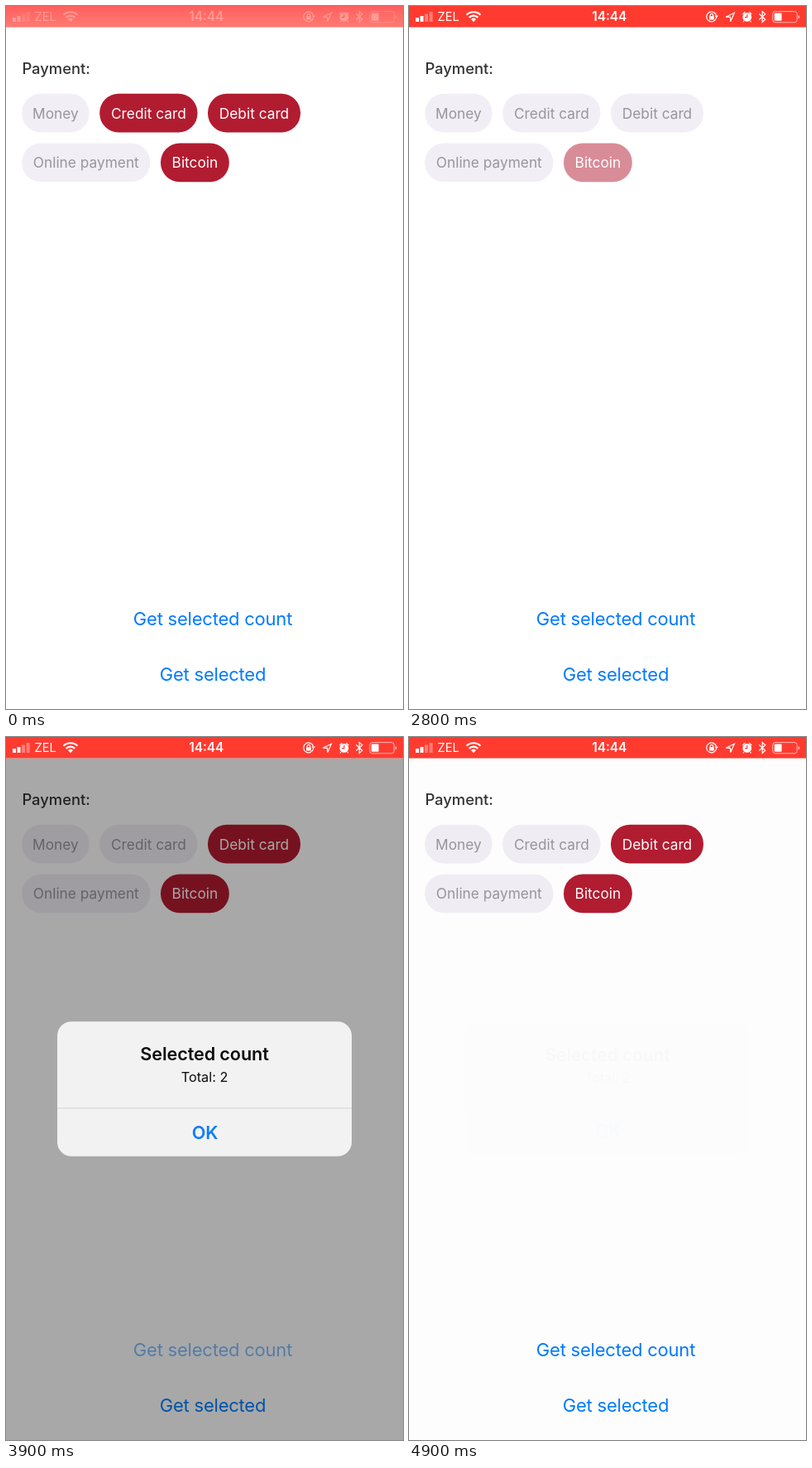
Animation, 480 px wide and 848 px high, one loop 5000 ms. Source, as an HTML page:

```html
<!DOCTYPE html>
<html lang="en">
<head>
<meta charset="utf-8">
<title>Payment chips</title>
<style>
  html, body { margin: 0; width: 100%; height: 100%; overflow: hidden; background: #fff; }
  svg { display: block; width: 100vw; height: 100vh; }
  text { font-family: Inter, Roboto, sans-serif; font-size: 17.3px; }
  .mid { text-anchor: middle; }
  .link { font-size: 22px; letter-spacing: -.01em; fill: #007aff; }
  .bold { font-size: 21px; font-weight: 600; letter-spacing: -.005em; }
  .line { fill: none; stroke: #fff; stroke-width: 1.2; }
</style>
</head>
<body>
<svg viewBox="0 0 480 848">
  <defs>
    <linearGradient id="wash" x2="0" y2="1">
      <stop offset="0" stop-color="#ff605e"/>
      <stop offset="1" stop-color="#ff7a72"/>
    </linearGradient>
    <clipPath id="card"><rect x="67.2" y="345.6" width="345.6" height="157.8" rx="16.6"/></clipPath>
  </defs>
  <rect width="480" height="848" fill="#fff"/>

  <text x="19.4" y="82" fill="#333" style="font-size:18.4px;font-weight:500">Payment:</text>
  <g id="chips"></g>
  <text id="count" class="mid link" x="250" y="747.3">Get selected count</text>
  <text class="mid link" x="250" y="814">Get selected</text>

  <rect id="dim" y="25.6" width="480" height="823"/>
  <g id="alert">
    <g clip-path="url(#card)">
      <rect x="67" y="345" width="346" height="159" fill="#f9f9f9"/>
      <rect id="row" x="67" y="447" width="346" height="57" fill="#ebebeb"/>
      <rect x="67" y="446.6" width="346" height="1" fill="#d9d9db"/>
    </g>
    <text class="mid bold" x="240" y="391.3">Selected count</text>
    <text class="mid" x="240" y="416.6" style="font-size:15.8px">Total: 2</text>
    <text class="mid bold" x="240.6" y="483.4" fill="#007aff">OK</text>
  </g>

  <rect id="bar" width="480" height="25.6"/>
  <g id="status" fill="#fff">
    <path d="M8 14h4v5h-4zM13.5 12h4v7h-4z"/>
    <path d="M19 9.5h4v9.5h-4zM24.6 7h4v12h-4z" opacity=".35"/>
    <text x="34.5" y="18.3" style="font-size:14.6px">ZEL</text>
    <path d="M78 19.2l-3-3.2a4.3 4.3 0 0 1 6 0z"/>
    <path class="line" style="stroke-width:2.2" d="M72.7 13.9a7.5 7.5 0 0 1 10.6 0M69.6 10.7a12 12 0 0 1 16.8 0"/>
    <text class="mid" x="242.3" y="18.4" style="font-size:15.4px;font-weight:600">14:44</text>
    <path class="line" d="M371.6 14.2a6 6 0 1 1 0-2.6M364.2 12.5v-1.4a1.7 1.7 0 0 1 3.4 0v1.4"/>
    <path d="M363 12.2h5.8v4.2h-5.8zM369.4 11.6h4.6l-2.3 3z"/>
    <path class="line" d="M383.2 13.2l10.2-5-4.6 10.4-.4-5.2z"/>
    <circle cx="408.8" cy="13.4" r="5.4"/>
    <path class="line" d="M403.3 10l3-2.8M414.3 10l-3-2.8M405 18l-1 1.4M412.6 18l1 1.4"/>
    <path class="line" style="stroke:#ff3b30" d="M408.8 10v3.6h-2.8"/>
    <path class="line" d="M423.4 9.5l7.4 6.8-3.6 3.2v-13l3.6 3.2-7.4 6.8"/>
    <rect class="line" style="stroke-width:1;opacity:.65" x="439.8" y="6.6" width="29.4" height="13.2" rx="3"/>
    <rect x="441.8" y="8.6" width="8.8" height="9.2" rx="1"/>
    <path d="M470.6 11a2.4 2.4 0 0 1 0 4.6z" opacity=".65"/>
  </g>
</svg>
<script>
const $ = id => document.getElementById(id);
const set = (el, attrs) => { for (const k in attrs) el.setAttribute(k, attrs[k]); };
const add = (parent, tag, attrs) => {
  const el = document.createElementNS("http://www.w3.org/2000/svg", tag);
  set(el, attrs);
  return parent.appendChild(el);
};

// Linear interpolation through [time, value] points
function track(t, points) {
  if (t <= points[0][0]) return points[0][1];
  for (let i = 1; i < points.length; i++) {
    const [a, u] = points[i - 1], [b, v] = points[i];
    if (t <= b) return u + (v - u) * (t - a) / (b - a);
  }
  return points[points.length - 1][1];
}

// taps: [time, selected afterwards]
const chips = [
  { label: "Money", x: 19.2, y: 105.8, w: 81.4 },
  { label: "Credit card", x: 113.2, y: 105.8, w: 118.3, on: true, taps: [[1800, false]] },
  { label: "Debit card", x: 244, y: 105.8, w: 112, on: true, taps: [[1300, false], [3100, true]] },
  { label: "Online payment", x: 19.2, y: 165.5, w: 155.2 },
  { label: "Bitcoin", x: 187, y: 165.5, w: 82.8, on: true, taps: [[2300, false], [2800, true]] },
];
for (const c of chips) {
  c.group = add($("chips"), "g", {});
  c.box = add(c.group, "rect", { x: c.x, y: c.y, width: c.w, height: 46.8, rx: 23 });
  c.text = add(c.group, "text", { class: "mid", x: c.x + c.w / 2, y: c.y + 29.9 });
  c.text.textContent = c.label;
}

const fadeOff = [[0, .5], [100, .35], [200, .78], [300, 1]];
const fadeOn = [[0, .5], [100, .82], [200, 1]];
const shown = [[3700, 0], [3800, .5], [3900, .85], [4000, .96], [4100, .99], [4200, 1],
               [4600, 1], [4700, .55], [4800, .15], [4900, .015]];
const countFade = [[3600, 1], [3700, .2], [3800, .22], [3900, .5], [4000, .85], [4100, 1]];

function drawChip(c, t) {
  let on = !!c.on, opacity = 1;
  for (const [start, next] of c.taps || []) {
    const dt = t - start;
    if (dt < 0) continue;
    opacity = track(dt, next ? fadeOn : fadeOff);
    if (next || dt >= 100) on = next;
  }
  set(c.group, { opacity });
  set(c.box, { fill: on ? "#b21c31" : "#f2eef6" });
  set(c.text, { fill: on ? "#fff" : "#98959c" });
}

function draw(t) {
  chips.forEach(c => drawChip(c, t));
  set($("count"), { opacity: track(t, countFade) });

  const a = track(t, shown), closing = t >= 4600;
  const scale = closing ? 1 : 1 + .2 * (1 - a);
  set($("dim"), { opacity: .4 * a });
  set($("alert"), {
    opacity: closing ? a : Math.sqrt(a),
    transform: `translate(240 424.5) scale(${scale}) translate(-240 -424.5)`,
  });
  set($("row"), { opacity: closing ? 1 : 0 });

  const washed = t < 100;
  set($("bar"), { fill: washed ? "url(#wash)" : "#ff3b30" });
  set($("status"), { opacity: washed ? .3 : 1 });
}

// The picture advances ten times a second
function tick() {
  draw(Math.floor(performance.now() % 5000 / 100) * 100);
  requestAnimationFrame(tick);
}
tick();
</script>
</body>
</html>
```
